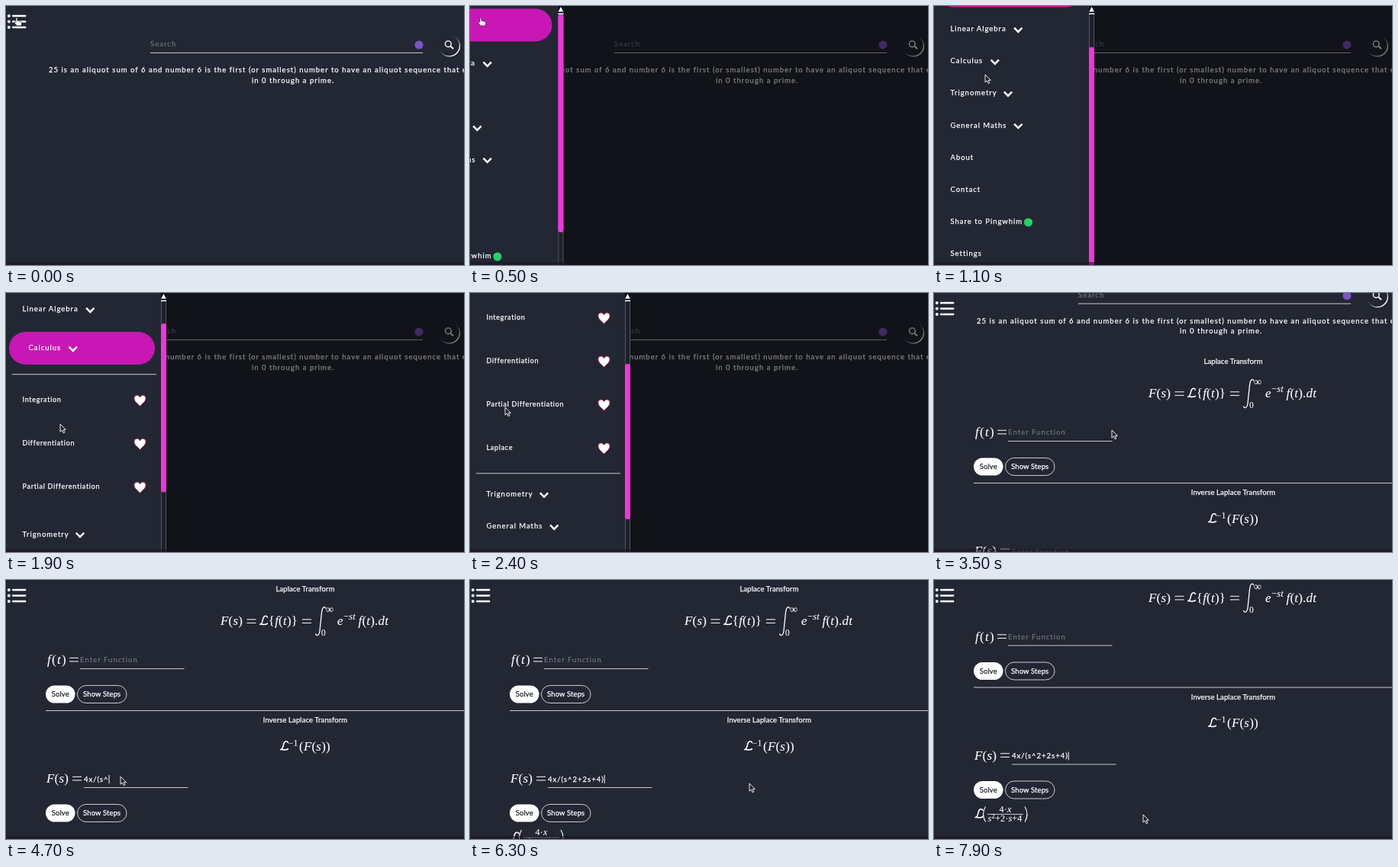
Write an HTML page that moves like this. It is 600 by 340 pixels and loops after 8000 ms.

```html
<!DOCTYPE html>
<html lang="en">
<head>
<meta charset="utf-8">
<title>Maths solver</title>
<style>
  html, body { margin: 0; width: 100%; height: 100%; overflow: hidden; background: #232733; }
  svg { display: block; width: 600px; height: 340px; }
  text { font-family: Lato, "Open Sans", sans-serif; font-size: 9.5px; color: #fff; fill: currentColor;
    stroke: currentColor; stroke-width: .25px; letter-spacing: .1px; white-space: pre; }
  .wide { letter-spacing: 1.03px; }
  .hint { color: #777a84; letter-spacing: 1.05px; stroke-width: .1px; }
  .menu { letter-spacing: .97px; }
  .sub { font-size: 9px; letter-spacing: .72px; }
  .mid { text-anchor: middle; }
  .math { font-family: "Liberation Serif", "Noto Serif", serif; letter-spacing: .2px; stroke-width: .1px; }
  .math .it { font-style: italic; }
  .airy { letter-spacing: 1.3px; }
  .line { fill: none; stroke: #fff; }
</style>
</head>
<body>
<svg id="stage" viewBox="0 0 600 340" xmlns="http://www.w3.org/2000/svg"></svg>
<script>
const BG = '#232733', PINK = '#c817b5', THUMB = '#f135dd';
const LOOP = 8000, STEP = 100;
const QUERY = '4x/(s^2+2s+4)';

// Drawing helpers; y of text is its vertical centre.
const text = (x, y, str, cls = '', extra = '') =>
  `<text x="${x}" y="${y + 3.4}" class="${cls}" ${extra}>${str}</text>`;
const path = (d, w = 1, extra = '') => `<path class="line" d="${d}" stroke-width="${w}" ${extra}/>`;
const hline = (x1, x2, y, extra = 'opacity=".75"') => path(`M${x1} ${y}H${x2}`, 1, extra);
const group = (id, body, extra = '') => `<g id="${id}" ${extra}>${body}</g>`;
const math = (x, base, str, size = 17, cls = '') =>
  `<text x="${x}" y="${base}" class="math ${cls}" style="font-size:${size}px">` +
  str.replace(/[a-z]+/gi, m => `<tspan class="it">${m}</tspan>`) + '</text>';
const equals = (x, y) => path(`M${x} ${y - 2.2}h12m-12 4.6h12`, 1);
const scriptL = (x, base) =>
  path('M11 -9.5C10.5 -13 6 -12.5 5.2 -8C4.6 -4 3.6 -1 .8 -.8C3.5 -2.4 6 1.6 11.4 -2', 1.6,
    `transform="translate(${x} ${base})"`);
const chevron = (x, y) => path(`M${x - 5.2} ${y - 2.3}l5.2 5.2l5.2 -5.2`, 2.5);
const heart = (x, y) => `<path transform="translate(${x} ${y})" fill="#fff" stroke="#c01a4a" stroke-width=".9"
  d="M0 7.5C-3 4.3 -7.6 1.4 -7.6 -2.7C-7.6 -7.4 -1.7 -8.4 0 -4C1.7 -8.4 7.6 -7.4 7.6 -2.7C7.6 1.4 3 4.3 0 7.5Z"/>`;
const pill = (id, y) => `<rect id="${id}" x="4" y="${y - 21.5}" width="191" height="43" rx="21.5" fill="${PINK}"/>`;
const buttons = y =>
  `<rect x="52" y="${y - 11.5}" width="38.5" height="23" rx="11.5" fill="#fff"/>` +
  text(71.3, y, 'Solve', 'mid', `style="color:${BG}"`) +
  `<rect class="line" x="93.5" y="${y - 11.5}" width="64.5" height="23" rx="11.5" stroke-width=".9" opacity=".85"/>` +
  text(125.7, y, 'Show Steps', 'mid');

const header =
  text(189, 50, 'Search', 'hint') + hline(189, 546, 61.5) +
  '<circle cx="541" cy="51" r="5.5" fill="#7d52c4"/>' +
  `<circle cx="581.2" cy="52.7" r="13.8" fill="#fff"/><circle cx="580.2" cy="51.7" r="13.7" fill="${BG}"/>` +
  '<circle class="line" cx="579.3" cy="49.8" r="3.9" stroke-width="1.4"/>' + path('M582.2 52.6l3.8 3.6', 1.9) +
  text(56, 84, '25 is an aliquot sum of 6 and number 6 is the first (or smallest) number to have an aliquot sequence that ends', 'wide') +
  text(322, 97.5, 'in 0 through a prime.', 'wide');

const solver =
  text(392, 90, 'Laplace Transform', 'mid') +
  math(281, 137, 'F(s)') + equals(315.5, 132) + scriptL(331.5, 137) + math(343.8, 137, '{f(t)}') + equals(388, 132) +
  path('M405.5 148.5C406.5 152 410 151.5 411 145L413.6 120C414.6 113 417.8 112 418.8 115.5', 1.3) +
  math(419, 121, '∞', 14) + math(413, 151, '0', 11.5) +
  math(434, 137, 'e') + math(442, 130, '−st', 12.5) + math(461.5, 137, 'f(t).dt') +
  math(54, 188, 'f(t)', 17, 'airy') + equals(83, 182.5) + text(97, 183, 'Enter Function', 'hint') + hline(97, 233.5, 194.5) +
  buttons(228) + hline(52, 600, 249.5) +
  text(392, 262, 'Inverse Laplace Transform', 'mid') +
  scriptL(358.5, 301.5) + math(369.5, 295.5, '−1', 12) + math(384, 301.5, '(F(s))') +
  math(53, 344, 'F(s)') + equals(87, 338.5) +
  text(102, 339.5, 'Enter Function', 'hint', 'id="hint"') +
  text(102, 339.5, '', '', 'id="typed" style="letter-spacing:1px"') +
  path('M0 334v11', 1, 'id="caret"') + hline(102, 238.5, 350.5) + buttons(384) +
  group('answer',
    scriptL(53, 421) + path('M67.5 406q-6 10 0 20', 1.1) + path('M119 406q6 10 0 20', 1.1) +
    math(93.5, 413, '4·x', 12, 'mid') + hline(70, 117, 416) +
    math(70.5, 425.5, 's', 12) + math(75.5, 421.5, '2', 8.5) + math(80, 425.5, '+2·s+4', 12));

const hamburger = [13, 20.5, 28].map(y =>
  `<circle cx="3.8" cy="${y}" r="1.9" fill="#fff"/>` + path(`M9 ${y}H25.3`, 2.3, 'stroke-linecap="round"')).join('');

const subItems = ['Integration', 'Differentiation', 'Partial Differentiation', 'Laplace'].map((name, i) => {
  const y = 140 + 57 * i;
  return text(21.5, y, name, 'sub', i === 3 ? 'id="link"' : '') + heart(175.5, y + 1);
}).join('');

const lowerItems = ['Trignometry', 'General Maths', 'About', 'Contact', 'Share to Pingwhim', 'Settings']
  .map((name, i) => text(21.5, 114 + 42.2 * i, name, 'menu')).join('') +
  chevron(97, 115) + chevron(110.3, 157.2) + '<circle cx="123.5" cy="284" r="5.6" fill="#25d366"/>';

const sidebar =
  `<rect width="210" height="340" fill="${BG}"/>` +
  group('list',
    group('upper', pill('homePill', -20) + text(29, -20, 'Home', 'menu') +
      text(21.5, 30, 'Linear Algebra', 'menu') + chevron(110.3, 31)) +
    pill('calcPill', 72.5) + group('calc', text(21.5, 72, 'Calculus', 'menu') + chevron(79.8, 73)) +
    group('sub', hline(8, 197, 106.8) + subItems + hline(8, 197, 345), 'clip-path="url(#fold)"') +
    group('lower', lowerItems)) +
  '<rect x="203" width="7" height="340" fill="#1d2029"/>' + path('M203.5 0V340M209.5 0V340', .8, 'opacity=".3"') +
  '<rect x="203" width="7" height="11" fill="#0c0d10"/><path d="M203.2 7.5L206.5 1L209.8 7.5ZM203 9.5h7v1.5h-7z" fill="#fff"/>' +
  `<rect id="thumb" x="203" width="7" rx="3" fill="${THUMB}"/>`;

const arrow = '<path d="M0 0V10.2L2.5 8L4.2 11.8L5.9 11L4.3 7.4H7.3Z" fill="#20232c" stroke="#fff" stroke-width=".9"/>';
const hand = '<path d="M-1 1Q0 -.5 1 1V4.2L6 5.5Q7 6 6.7 7.5L5.8 11H.2L-3.4 6.6Q-3 5 -1 6.4Z" fill="#fff" stroke="#20232c" stroke-width=".7"/>';

const stage = document.getElementById('stage');
stage.innerHTML =
  '<clipPath id="fold"><rect id="foldBox" y="94" width="203" height="0"/></clipPath>' +
  `<rect width="600" height="340" fill="${BG}"/>` +
  group('page', header + group('solver', solver, 'transform="translate(0 47.5)"')) + hamburger +
  '<rect id="shade" width="600" height="340"/>' + group('side', sidebar) +
  '<rect y="336" width="600" height="4" fill="#1e1022" opacity=".55"/>' +
  group('arrow', arrow) + group('hand', hand);

const el = {};
stage.querySelectorAll('[id]').forEach(node => el[node.id] = node);

const clamp = u => Math.max(0, Math.min(1, u));
const ease = (t, from, to) => { const u = clamp((t - from) / (to - from)); return u * u * (3 - 2 * u); };
const move = (node, x, y) => node.setAttribute('transform', `translate(${x} ${y})`);
const show = (node, on) => node.setAttribute('visibility', on ? 'inherit' : 'hidden');

// Pointer stops: time, x, y
const pointer = [
  [0, 14, 15], [500, 14, 15], [850, 85, 75], [1100, 67, 90], [1350, 55, 74], [1550, 55, 74],
  [1900, 71, 172], [2400, 46, 150], [2700, 46, 146], [3100, 46, 146], [3500, 233, 180],
  [3800, 233, 180], [4150, 150, 258], [5100, 150, 258], [5350, 67, 303], [5800, 67, 303],
  [6300, 366, 267], [6900, 366, 267], [7700, 274, 308], [LOOP, 274, 308]
];
function pointerAt(t) {
  const i = pointer.findIndex(p => p[0] > t);
  const [a, b] = [pointer[i - 1], pointer[i]];
  const u = ease(t, a[0], b[0]);
  return [a[1] + (b[1] - a[1]) * u, a[2] + (b[2] - a[2]) * u];
}

function draw(t) {
  const scroll = 47.5 * ease(t, 3250, 3500) + 78 * ease(t, 3700, 4100) + 30.5 * ease(t, 6500, 6900);
  move(el.page, 0, -scroll);
  show(el.solver, t >= 3200);

  const opened = ease(t, 250, 700), closed = ease(t, 2890, 3320);
  move(el.side, 210 * (opened - 1 - closed), 0);
  el.shade.setAttribute('opacity', .5 * ease(t, 250, 500) * (1 - ease(t, 3150, 3350)));

  const first = ease(t, 700, 1050), unfold = ease(t, 1550, 2050), second = ease(t, 2100, 2600);
  const active = t >= 1500;
  move(el.list, 0, 45 * (1 - first) - 167 * second);
  move(el.upper, 0, active ? -9 : 0);
  move(el.calc, active ? 8 : 0, 0);
  move(el.lower, 0, 258 * unfold);
  show(el.homePill, !active);
  show(el.calcPill, active);
  el.foldBox.setAttribute('height', Math.max(0, 258 * unfold - 5));
  el.thumb.setAttribute('y', 11 + 43 * first - 18 * unfold + 88 * second);
  el.thumb.setAttribute('height', 286 - 82 * unfold);
  const hover = t >= 2500;
  el.link.style.textDecoration = hover ? `underline 1.5px ${THUMB}` : 'none';
  el.link.style.color = hover ? '#f7d9f4' : '#fff';

  const typed = QUERY.slice(0, Math.max(0, Math.floor((t - 4300) / 60)));
  el.typed.textContent = typed;
  show(el.hint, !typed);
  show(el.caret, t >= 4200);
  move(el.caret, 102.5 + (typed ? el.typed.getComputedTextLength() : 0), 0);
  show(el.answer, t >= 5700);

  const [x, y] = pointerAt(t), pointing = t < 600;
  move(el.arrow, x, y);
  move(el.hand, x, y);
  show(el.arrow, !pointing);
  show(el.hand, pointing);
}

const start = performance.now();
function frame() {
  const t = (performance.now() - start) % LOOP;
  draw(Math.floor(t / STEP) * STEP);
  requestAnimationFrame(frame);
}
frame();
</script>
</body>
</html>
```
